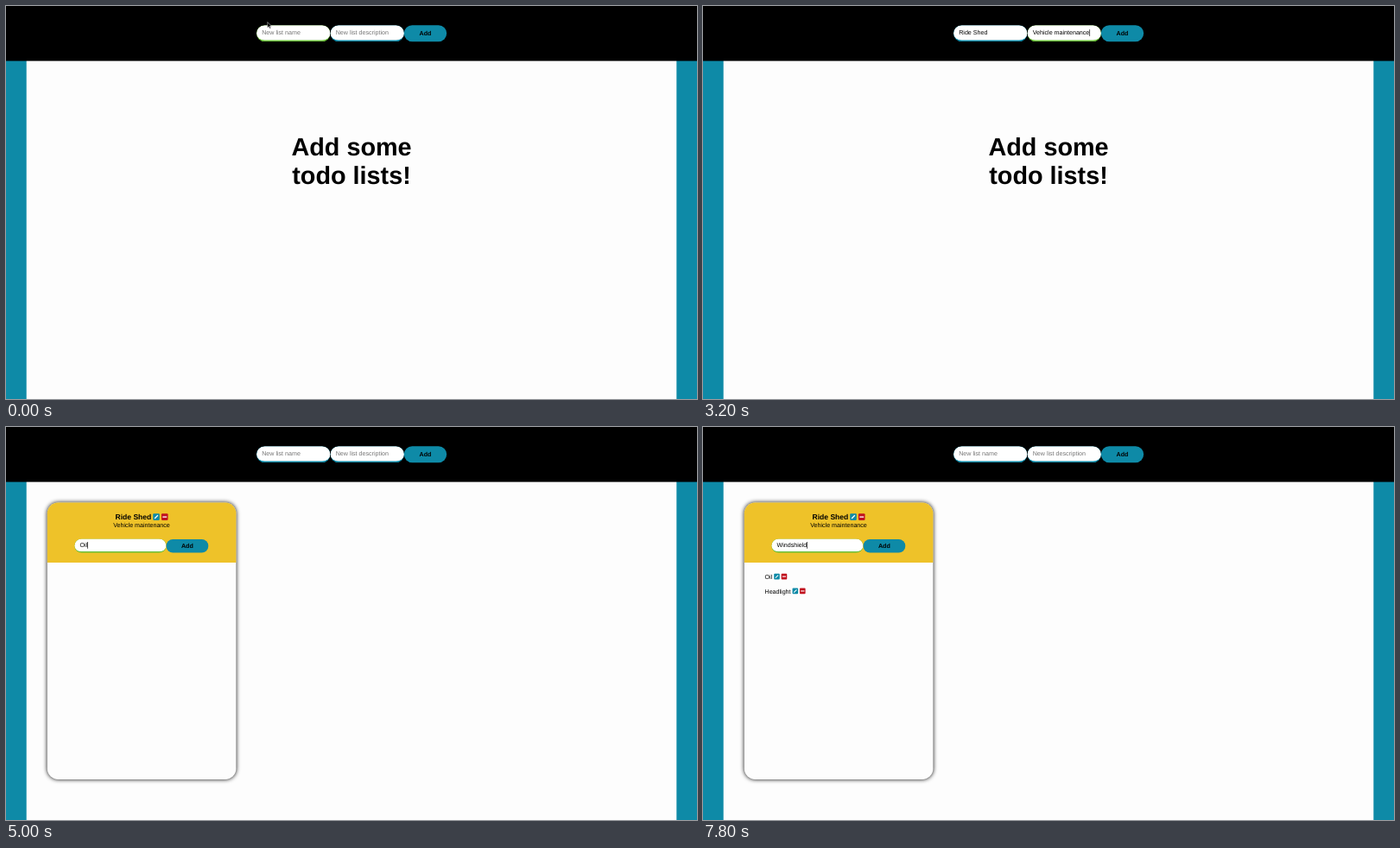
Write an HTML page with a canvas that moves like this. It is 800 px wide and 455 px high and loops after 8 s.

```html
<!DOCTYPE html>
<html lang="en">
<head>
<meta charset="utf-8">
<title>Todo lists</title>
<style>
html, body { margin: 0; width: 100%; height: 100%; overflow: hidden; background: #fdfdfd; }
canvas { display: block; width: 800px; height: 455px; }
</style>
</head>
<body>
<canvas id="stage"></canvas>
<script>
const W = 800, H = 455, LOOP = 8000, STEP = 200;
const TEAL = '#0e8aa7', GREEN = '#6dc23c', RED = '#c1121f', YELLOW = '#eec229', PAPER = '#fdfdfd', HINT = '#757575';
const SMALL = 7.11;
const FONT = '"Liberation Sans", Arial, sans-serif';
const LIST_NAME = 'Ride Shed', LIST_INFO = 'Vehicle maintenance';

const canvas = document.getElementById('stage');
const ctx = canvas.getContext('2d');
const ratio = window.devicePixelRatio || 1;
canvas.width = W * ratio;
canvas.height = H * ratio;

function rect(x, y, w, h, color) {
  ctx.fillStyle = color;
  ctx.fillRect(x, y, w, h);
}

function rounded(x, y, w, h, r, color) {
  ctx.beginPath();
  ctx.roundRect(x, y, w, h, r);
  ctx.fillStyle = color;
  ctx.fill();
}

function text(str, x, y, { size = SMALL, bold = false, color = '#000', align = 'left' } = {}) {
  ctx.font = `${bold ? 'bold ' : ''}${size}px ${FONT}`;
  ctx.textAlign = align;
  ctx.fillStyle = color;
  ctx.fillText(str, x, y);
  return ctx.measureText(str).width;
}

function polyline(points, color, width) {
  ctx.beginPath();
  points.forEach(([x, y]) => ctx.lineTo(x, y));
  ctx.strokeStyle = color;
  ctx.lineWidth = width;
  ctx.stroke();
}

// Pill input whose bottom border shows as a crescent
function input(x, y, w, h, { value, hint, focus, caret }) {
  const r = h / 2, line = 1.7;
  ctx.save();
  ctx.beginPath();
  ctx.roundRect(x, y, w, h, r);
  ctx.clip();
  rect(x, y, w, h, focus ? GREEN : TEAL);
  const bottom = { x: r, y: r - line };
  rounded(x, y, w, h - line, [r, r, bottom, bottom], '#fff');
  ctx.restore();
  const left = x + 6.2, base = y + h / 2 + 1.7;
  const width = text(value || hint, left, base, { color: value ? '#000' : HINT });
  if (caret) rect(left + (value ? width : 0) + 0.1, base - 6.3, 0.65, 7.8, '#000');
}

function button(x, y, w, h) {
  rounded(x, y, w, h, h / 2, TEAL);
  text('Add', x + w / 2, y + h / 2 + 2.5, { bold: true, align: 'center' });
}

function icons(x, y, size) {
  const gap = size * 1.28;
  rounded(x, y, size, size, size * 0.14, TEAL);
  rounded(x + gap, y, size, size, size * 0.14, RED);
  polyline([[x + size * 0.25, y + size * 0.75], [x + size * 0.74, y + size * 0.26]], '#fff', size * 0.16);
  rect(x + gap + size * 0.18, y + size * 0.42, size * 0.64, size * 0.17, '#fff');
}

function item(label, base) {
  const width = text(label, 71.5, base);
  icons(71.5 + width + 2, base - 6.2, 6.6);
}

function pointer(x, y) {
  const shape = [[0, 0], [0, 6.4], [1.5, 5.1], [2.6, 7.5], [3.6, 7], [2.6, 4.7], [4.5, 4.6]];
  ctx.beginPath();
  shape.forEach(([dx, dy]) => ctx.lineTo(x + dx, y + dy));
  ctx.closePath();
  ctx.fillStyle = '#000';
  ctx.fill();
  ctx.strokeStyle = '#bbb';
  ctx.lineWidth = 0.6;
  ctx.stroke();
}

// Text as typed from `first` letters at `start` to all of it at `end`, cleared at `clear`
function typed(str, t, start, end, clear, first = 1) {
  if (t < start || t >= clear) return '';
  const part = Math.min(1, (t - start) / (end - start));
  return str.slice(0, Math.round(first + (str.length - first) * part));
}

function focusAt(t) {
  return t < 1800 ? 'name' : t < 4000 ? 'info' : t < 4400 ? '' : 'todo';
}

function card(t, focus) {
  const x = 47.8, y = 87.6, w = 218.6, h = 320.4, r = 12.5;
  ctx.save();
  ctx.shadowColor = '#000';
  ctx.shadowBlur = 5.3 * ratio;
  rounded(x, y, w, h, r, PAPER);
  ctx.restore();
  rounded(x, y, w, 69.4, [r, r, 0, 0], YELLOW);

  text(LIST_NAME, 126.6, 107.2, { size: 8.53, bold: true });
  icons(170.2, 100.3, 7.6);
  text(LIST_INFO, 157, 115.8, { align: 'center' });

  const value = typed('Oil', t, 4600, 5000, 5400)
    || typed('Headlight', t, 5600, 6200, 6600)
    || typed('Windshield', t, 7000, 7800, LOOP);
  const active = focus === 'todo';
  input(79.3, 129.5, 106.2, 16.2, { value, hint: 'Todo', focus: active, caret: active });
  button(185.5, 130, 48.8, 15.4);

  if (t >= 5400) item('Oil', 176);
  if (t >= 6600) item('Headlight', 192.8);
}

function draw(t) {
  const focus = focusAt(t), added = t >= 3400;
  ctx.setTransform(ratio, 0, 0, ratio, 0, 0);
  ctx.textRendering = 'geometricPrecision';
  rect(0, 0, W, H, TEAL);
  rect(23.7, 0, 752.6, H, PAPER);
  rect(0, 0, W, 63.6, '#000');

  input(290, 22.3, 85.5, 18.9, {
    value: typed(LIST_NAME, t, 400, 1400, 3400),
    hint: 'New list name',
    focus: focus === 'name',
    caret: focus === 'name' && t >= 400
  });
  input(375.5, 22.3, 85.5, 18.9, {
    value: typed(LIST_INFO, t, 2000, 3200, 3400, 2),
    hint: 'New list description',
    focus: focus === 'info',
    caret: focus === 'info' && t < 3800
  });
  button(460.8, 22.3, 49.4, 18.9);

  if (added) {
    card(t, focus);
  } else {
    const heading = { size: 28.8, bold: true, align: 'center' };
    text('Add some', 400, 172.6, heading);
    text('todo lists!', 400, 205.7, heading);
  }
  if (t < 400) pointer(302.8, 18.6);
}

function frame() {
  const t = performance.now() % LOOP;
  draw(Math.floor(t / STEP) * STEP);
  requestAnimationFrame(frame);
}
frame();
</script>
</body>
</html>
```
